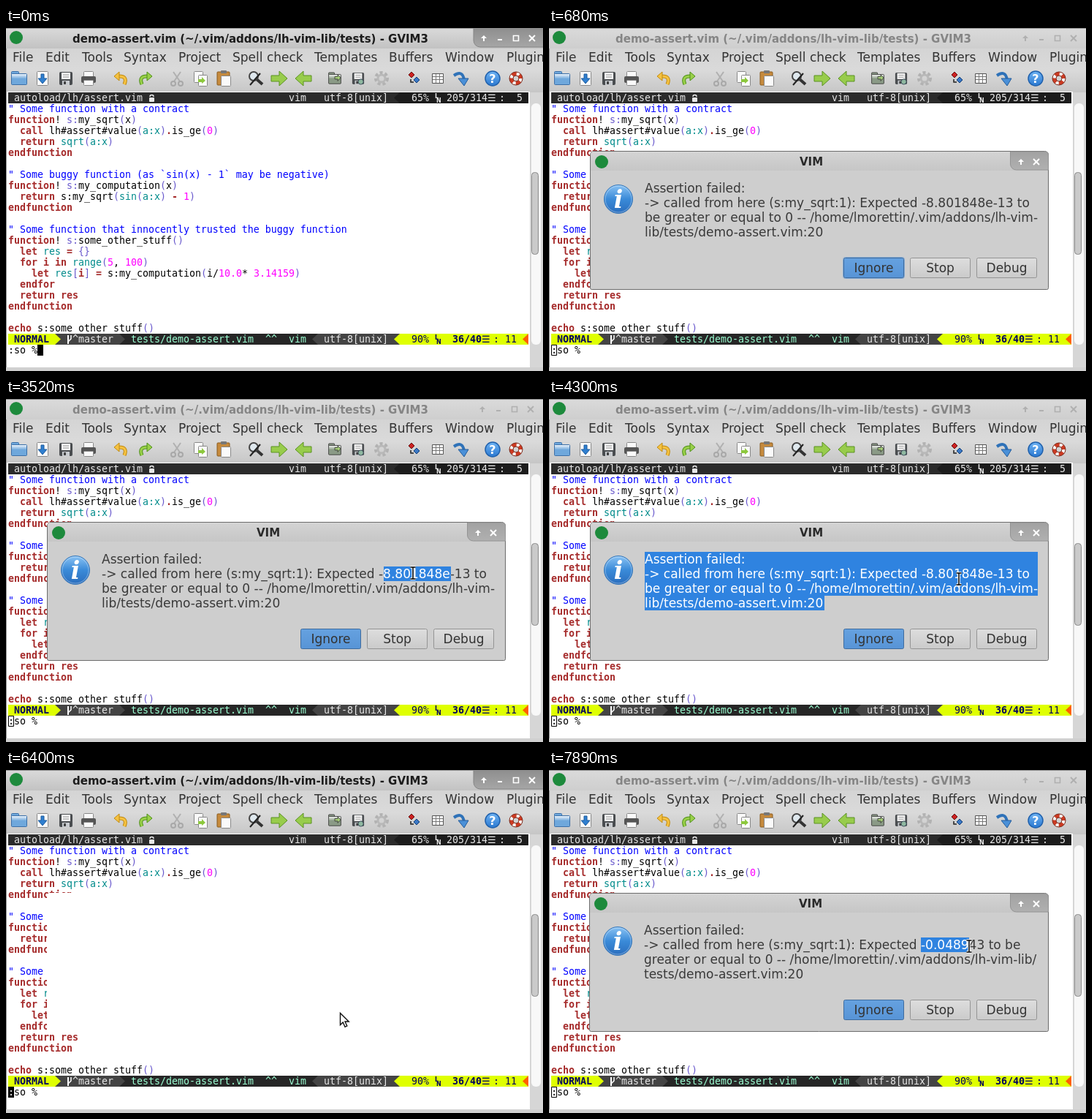
Write an HTML page with a canvas that moves like this. It is 735 px wide and 469 px high and loops after 8 s.

```html
<!DOCTYPE html>
<html lang="en">
<head>
<meta charset="utf-8">
<title>Assertion demo</title>
<style>
html, body { margin: 0; width: 100%; height: 100%; overflow: hidden; background: #d6d6d6; }
canvas { display: block; }
</style>
</head>
<body>
<canvas id="stage" width="735" height="469"></canvas>
<script>
const g = document.getElementById('stage').getContext('2d');
const MONO = '13.29px "DejaVu Sans Mono", monospace';
const SANS = '17px "DejaVu Sans", sans-serif';
const TITLE = 'bold 15px "DejaVu Sans", sans-serif';
const LOOP = 8000;

// ---------- drawing helpers ----------
function paint(fill, stroke, width = 1) {
  if (fill) { g.fillStyle = fill; g.fill(); }
  if (stroke) { g.strokeStyle = stroke; g.lineWidth = width; g.stroke(); }
}
function box(x, y, w, h, fill, r = 0, stroke) {
  g.beginPath();
  g.roundRect(x, y, w, h, r);
  paint(fill, stroke);
}
function disc(x, y, r, fill, stroke, width) {
  g.beginPath();
  g.arc(x, y, r, 0, 7);
  paint(fill, stroke, width);
}
function poly(points, fill, stroke, width, open) {
  g.beginPath();
  for (let i = 0; i < points.length; i += 2) g.lineTo(points[i], points[i + 1]);
  if (!open) g.closePath();
  paint(fill, stroke, width);
}
const line = (points, color, width) => poly(points, null, color, width, true);
function text(s, x, y, color, font = SANS, align = 'left') {
  g.font = font;
  g.textAlign = align;
  g.fillStyle = color;
  g.fillText(s, x, y);
}
function fade(y0, y1, ...colors) {
  const f = g.createLinearGradient(0, y0, 0, y1);
  colors.forEach((c, i) => f.addColorStop(i / (colors.length - 1), c));
  return f;
}
function place(x, y, draw, sx = 1, sy = 1) {
  g.save();
  g.translate(x, y);
  g.scale(sx, sy);
  draw();
  g.restore();
}
const col = c => 3 + 8 * c;
const row = r => 88 + 15 * r;
const mono = (s, c, r, color, bold) =>
  text(s, col(c), row(r) + 12, color, (bold ? 'bold ' : '') + MONO);

// ---------- toolbar ----------
function folder(color, edge) {
  box(-10.5, -9.5, 10, 6, color, 1, edge);
  box(-10.5, -6.5, 21, 15, fade(-7, 8, '#fff', color, color), 1, edge);
}
const page = (x, y, w, h) => box(x + .5, y + .5, w, h, '#fafafa', 1, '#888');
function floppy() {
  box(-9, -9, 18, 18, '#4a4d50', 2);
  box(-6, -8, 12, 9, '#f4f4f4');
  line([-4, -5, 4, -5], '#999');
  line([-4, -2, 4, -2], '#999');
  box(-5, 3, 10, 6, '#c9ccd0');
  box(-3, 4, 3, 4, '#444');
}
function bend(color, edge) {
  for (const [c, w] of [[edge, 5], [color, 3]]) {
    g.beginPath();
    g.moveTo(-5, -3);
    g.quadraticCurveTo(9, -4, 4, 8);
    paint(null, c, w);
  }
  poly([-10, -3, -3, -9, -3, 3], color, edge);
}
const bigArrow = () =>
  poly([-11, -4, 0, -4, 0, -10, 11, 0, 0, 10, 0, 4, -11, 4], '#98cc4c', '#5a9220');
function gear() {
  g.setLineDash([4, 3]);
  disc(0, 0, 8, null, '#b2b2b2', 4);
  g.setLineDash([]);
  disc(0, 0, 5, null, '#b8b8b8', 3);
}
const icons = [
  [18, () => folder('#6fa8dc', '#3b6fa8')],
  [50, () => { page(-8, -10, 15, 19); poly([-2, -6, 2, -6, 2, 0, 6, 0, 0, 7, -6, 0, -2, 0], '#2f7fd0', '#1c5a9c'); }],
  [82, floppy],
  [113, () => { page(-7, -10, 13, 9); box(-10, -3, 20, 9, '#555', 2); page(-7, 2, 13, 7); }],
  [158, () => bend('#f5c242', '#c08a10')],
  [190, () => bend('#9ad04a', '#4e9018'), -1],
  [234, () => {
    line([-5, -9, 4, 4], '#b0b0b0', 2); line([5, -9, -4, 4], '#b0b0b0', 2);
    disc(-5, 7, 3, null, '#a8a8a8', 2); disc(5, 7, 3, null, '#a8a8a8', 2);
  }],
  [266, () => { page(-9, -10, 12, 15); page(-3, -5, 12, 15); poly([-3, 1, 2, 1, 2, -2, 7, 3, 2, 7, 2, 5, -3, 5], '#8cc83c'); }],
  [298, () => { box(-9, -9, 17, 18, '#c58a3e', 1, '#8a5a1c'); box(-4, -11, 8, 4, '#777', 1); page(-4, -4, 13, 14); }],
  [342, () => {
    line([1, 1, 9, 8], '#333', 4); disc(-3, -3, 6, '#dfe8ee', '#444', 2);
    line([-8, 9, 6, -7], '#222', 2);
  }],
  [374, bigArrow],
  [407, bigArrow, -1],
  [450, () => { folder('#8a9a86', '#333'); poly([0, -3, 5, -3, 5, -6, 10, -1, 5, 4, 5, 1, 0, 1], '#a4cc78', '#333'); }, .8, .85],
  [482, () => { floppy(); disc(4, 5, 4, '#8fb8a0', '#345'); }, .9, .9],
  [514, gear],
  [558, () => {
    poly([-3, -9, 1, -5, -3, -1, -7, -5], '#c22', '#611');
    poly([4, -2, 8, 2, 4, 6, 0, 2], '#3b78c4', '#123e78');
    line([-4, 1, -4, 5, 0, 5], '#222', 1.5);
  }],
  [591, () => {
    box(-7.5, -6.5, 15, 13, '#fff', 0, '#555');
    for (const k of [-3, 1]) line([-7, k + .5, 7, k + .5], '#777');
    for (const k of [-3, 2]) line([k + .5, -6, k + .5, 6], '#777');
  }],
  [622, () => {
    g.beginPath(); g.moveTo(-9, -4); g.quadraticCurveTo(3, -12, 5, 2); paint(null, '#2f72b8', 4);
    poly([-3, 0, 11, 0, 5, 10], '#4a90d8', '#225c9c');
  }],
  [666, () => {
    disc(0, 0, 10, fade(-10, 10, '#6fb4f4', '#2a78d0'), '#1f60ac', 1.5);
    text('?', 0, 6, '#fff', 'bold 16px "DejaVu Sans", sans-serif', 'center');
  }],
  [698, () => {
    disc(0, 0, 6.5, null, '#cc3a22', 5);
    g.setLineDash([4, 6.2]); disc(0, 0, 6.5, null, '#f4f4f4', 5); g.setLineDash([]);
    disc(0, 0, 9, null, '#7a2a1c'); disc(0, 0, 4, null, '#7a2a1c');
  }]
];

// ---------- window chrome ----------
const glyphs = {
  up: c => { poly([0, -4, 4, 0, -4, 0], c); box(-1, 0, 2, 4, c); },
  min: c => box(-3, 1, 6, 2, c),
  max: c => { g.beginPath(); g.rect(-3.5, -3.5, 7, 7); paint(null, c, 1.6); },
  close: c => { line([-4, -4, 4, 4], c, 2); line([4, -4, -4, 4], c, 2); }
};
const menus = [['File', 9], ['Edit', 54], ['Tools', 104], ['Syntax', 161], ['Project', 236],
  ['Spell check', 310], ['Templates', 422], ['Buffers', 524], ['Window', 601], ['Plugin', 685]];

function chrome(active) {
  box(0, 0, 735, 469, '#d6d6d6');
  box(0, 0, 735, 28, active ? fade(0, 28, '#dadada', '#c2c2c2') : fade(0, 28, '#dadada', '#cecece'));
  box(0, 28, 735, 60, fade(28, 88, '#d4d4d4', '#dadada', '#c6c6c6'));
  box(0, 0, 735, 1, '#8c8c8c');
  disc(14, 13, 9, '#1d8a3c');
  text('demo-assert.vim (~/.vim/addons/lh-vim-lib/tests) - GVIM3', 91, 20, active ? '#1c1c1c' : '#858585', TITLE);
  if (active) box(640, 0, 96, 26, fade(0, 26, '#8e8e8e', '#a6a6a6'), [0, 0, 0, 9], '#858585');
  Object.values(glyphs).forEach((draw, i) =>
    place((active ? 654 : 652) + 22 * i, 14, () => draw(active ? '#fff' : '#b0b0b0')));
  for (const [s, x] of menus) text(s, x, 46, '#333');
  for (const [x, draw, sx, sy] of icons) place(x, 69, draw, sx, sy);

  box(1, 87, 716, 377, '#fff');
  box(0, 28, 1, 441, '#9a9a9a');
  box(0, 464, 735, 5, '#d0d0d0');
  box(719, 103, 13, 330, '#f8f8f8', 6);
  box(719.5, 197.5, 9, 112, '#cacaca', 4, '#8a8a8a');
}

// ---------- editor ----------
const tones = { c: '#0000ff', k: '#a52a2a', p: '#6a5acd', t: '#008b8b', m: '#ff00ff', n: '#000' };
// each piece starts with its tone letter
const code = [
  'c" Some function with a contract',
  'kfunction|n! |ps:|nmy_sqrt|p(|nx|p)',
  'k  call |nlh#assert#value|p(|ta:x|p)|k.|nis_ge|p(|m0|p)',
  'k  return |tsqrt|p(|ta:x|p)',
  'kendfunction',
  '',
  'c" Some buggy function (as `sin(x) - 1` may be negative)',
  'kfunction|n! |ps:|nmy_computation|p(|nx|p)',
  'k  return |ns:my_sqrt|p(|tsin|p(|ta:x|p)|k - |m1|p)',
  'kendfunction',
  '',
  'c" Some function that innocently trusted the buggy function',
  'kfunction|n! |ps:|nsome_other_stuff|p()',
  'k  let |tres |k= |p{}',
  'k  for i in |trange|p(|m5|n, |m100|p)',
  'k    let |tres|p[|ki|p]|k = |ns:my_computation|p(|ni/|m10.0|n* |m3.14159|p)',
  'k  endfor',
  'k  return res',
  'kendfunction',
  '',
  'kecho |ns:some_other_stuff|p()'
];

const cells = (a, b, r, fill) => box(col(a), row(r), 8 * (b - a), 15, fill);
function wedge(c, r, color, left) {
  const [tip, base] = left ? [col(c), col(c + 1)] : [col(c + 1), col(c)];
  poly([base, row(r), tip, row(r) + 7.5, base, row(r) + 15], color);
}
function lineMark(r, color) {
  const font = 'bold 8px "DejaVu Sans", sans-serif';
  text('L', col(73), row(r) + 8, color, font);
  text('N', col(73) + 2, row(r) + 14, color, font);
}
const trigram = (c, r, color) =>
  text('☰', col(c), row(r) + 12, color, '13px "DejaVu Sans", sans-serif');

function statusBars() {
  const pale = '#e8e8e8', dim = '#444', lime = '#dfff00', navy = '#00005f', mint = '#9cffd3';
  cells(0, 89, 0, '#2b2b2b');
  cells(67, 89, 0, '#1c1c1c');
  wedge(66, 0, '#1c1c1c', true);
  mono('autoload/lh/assert.vim', 1, 0, pale);
  box(196, 95, 7, 6, pale, 1);
  g.beginPath(); g.arc(199.5, 94, 2.5, Math.PI, 0); paint(null, pale, 1.5);
  mono('vim', 48, 0, pale);
  mono('utf-8[unix]', 54, 0, pale);
  mono('65%', 69, 0, pale);
  lineMark(0, pale);
  mono('205/314', 75, 0, pale);
  trigram(82, 0, pale);
  mono(':  5', 84, 0, pale);

  cells(0, 89, 22, '#262626');
  cells(0, 8, 22, lime);
  cells(8, 19, 22, dim);
  wedge(8, 22, lime);
  wedge(19, 22, dim);
  cells(53, 67, 22, dim);
  wedge(52, 22, dim, true);
  cells(67, 89, 22, lime);
  wedge(66, 22, lime, true);
  wedge(88, 22, '#ff5f00', true);
  mono('NORMAL', 1, 22, navy, true);
  line([85, 420, 85, 432], '#fff', 2);
  line([85, 429, 89, 425, 89, 420], '#fff', 1.5);
  mono('^master', 11, 22, pale);
  mono('tests/demo-assert.vim  ^^  vim', 21, 22, mint);
  mono('utf-8[unix]', 54, 22, pale);
  mono('90%', 69, 22, navy);
  lineMark(22, navy);
  mono('36/40', 76, 22, navy, true);
  trigram(81, 22, navy);
  mono(': 11', 83, 22, navy);
}

function editor(cursor) {
  code.forEach((src, r) => {
    let c = 0;
    if (src) for (const piece of src.split('|')) {
      const s = piece.slice(1);
      mono(s, c, r + 1, tones[piece[0]], piece[0] === 'k');
      c += s.length;
    }
  });
  statusBars();
  mono(':so %', 0, 23, '#000');
  if (cursor === 'end') cells(5, 6, 23, '#000');
  else if (cursor === 'solid') { cells(0, 1, 23, '#000'); mono(':', 0, 23, '#fff'); }
  else box(3.5, 433.5, 7, 14, null, 0, '#000');
}

// ---------- dialog ----------
const messages = [
  ['Assertion failed:',
    '-> called from here (s:my_sqrt:1): Expected -8.801848e-13 to',
    'be greater or equal to 0 -- /home/lmorettin/.vim/addons/lh-vim-',
    'lib/tests/demo-assert.vim:20'],
  ['Assertion failed:',
    '-> called from here (s:my_sqrt:1): Expected -0.048943 to be',
    'greater or equal to 0 -- /home/lmorettin/.vim/addons/lh-vim-lib/',
    'tests/demo-assert.vim:20']
];
// start time, caret x, selected rectangles
const marks = [
  [0, 0, []],
  [3520, 0, [[517, 229, 92, 20]]],
  [3640, 0, [[131, 209, 538, 60], [131, 269, 246, 20]]],
  [4610, 554, []],
  [6400, 0, []],
  [7740, 509, []],
  [7890, 0, [[509, 229, 66, 20]]]
];
const latest = (list, t) => list.findLast(e => e[0] <= t);

function button(label, x, fill, edge) {
  box(x + .5, 314.5, 82, 27, fill, 2, edge);
  text(label, x + 41.5, 334, '#333', SANS, 'center');
}

function dialog(t) {
  const second = t >= 6520, dx = second ? -1 : 0;
  const focus = second ? t < 7620 : t < 3400;
  const hover = t >= 5160 && t < 7200;
  box(56.5 + dx, 168.5, 627 - dx, 189, '#cecece', [5, 5, 2, 2], '#6c6c6c');
  box(57 + dx, 169, 626 - dx, 26, fade(169, 195, '#d4d4d4', '#c6c6c6'), [4, 4, 0, 0]);
  disc(72 + dx, 183, 9, '#1d8a3c');
  text('VIM', 343 + dx, 188, '#2a2a2a', TITLE);
  box(631.5, 169, 52, 25, fade(169, 194, '#a2a2a2', '#b0b0b0'), [0, 4, 0, 8], '#949494');
  place(646, 183, () => glyphs.up('#fff'));
  place(667, 183, () => glyphs.close('#fff'));

  disc(95 + dx, 234, 19.5, fade(214, 254, '#8cc4f4', '#3a8ad8', '#2a6cbc'), '#3a78b8');
  disc(95 + dx, 234, 18, null, 'rgba(255,255,255,.35)');
  text('i', 95 + dx, 246, '#fff', 'italic bold 33px "DejaVu Serif", serif', 'center');

  const write = color => messages[+second].forEach((s, i) => text(s, 131 + dx, 225 + 20 * i, color));
  write('#3a3a3a');
  const [, caret, rects] = latest(marks, t);
  for (const r of rects) {
    g.save();
    g.beginPath(); g.rect(...r); g.clip();
    paint('#2f83e0');
    write('#fff');
    g.restore();
  }
  if (caret) box(caret, 230, 1, 19, '#000');

  if (focus) box(402.5, 313.5, 84, 29, null, 3, '#86abd4');
  button('Ignore', 403, hover ? fade(314, 342, '#72aeea', '#60a0e2') : fade(314, 342, '#66a2e0', '#5794d6'), '#3f6c9e');
  button('Stop', 494, fade(314, 342, '#dedede', '#cacaca'), '#949494');
  button('Debug', 585, fade(314, 342, '#dedede', '#cacaca'), '#949494');
}

// ---------- pointer ----------
function arrow() {
  poly([.5, .5, .5, 16.5, 4.2, 13, 7, 19.3, 9.8, 18, 7, 12, 12.2, 12], '#fff', '#111', 1.4);
}
function beam() {
  for (const [c, w] of [['#fff', 3.5], ['#000', 1.5]]) {
    line([0, -8, 0, 8], c, w);
    for (const y of [-8, 8]) line([-3.5, y, 3.5, y], c, w);
  }
}
const path = [
  [2890, 692, 267, arrow], [3040, 662, 271, arrow],
  [3160, 618, 260, beam], [3280, 580, 246, beam], [3400, 557, 238, beam],
  [3800, 575, 269, beam], [3940, 573, 265, beam], [4060, 569, 258, beam],
  [4180, 564, 251, beam], [4300, 561, 246, beam],
  [4730, 501, 292, arrow], [4890, 472, 311, arrow], [5040, 463, 323, arrow], [5160, 457, 332, arrow],
  [7200, 466, 303, arrow], [7320, 481, 269, beam], [7470, 507, 252, beam],
  [7620, 514, 239, beam], [7890, 575, 241, beam]
];

// ---------- timeline ----------
function render(t) {
  const reopening = t >= 6400 && t < 6640;
  chrome(t < 680 || reopening);
  editor(t < 560 ? 'end' : t < 680 || reopening ? 'solid' : 'hollow');
  if (t >= 6400 && t < 6520) box(56, 168, 628, 190, '#fff', [5, 5, 0, 0]);
  else if (t >= 560) dialog(t);
  const p = latest(path, t);
  if (p) place(p[1], p[2], p[3]);
}
const start = performance.now();
function tick() {
  render((performance.now() - start) % LOOP);
  requestAnimationFrame(tick);
}
tick();
</script>
</body>
</html>
```
